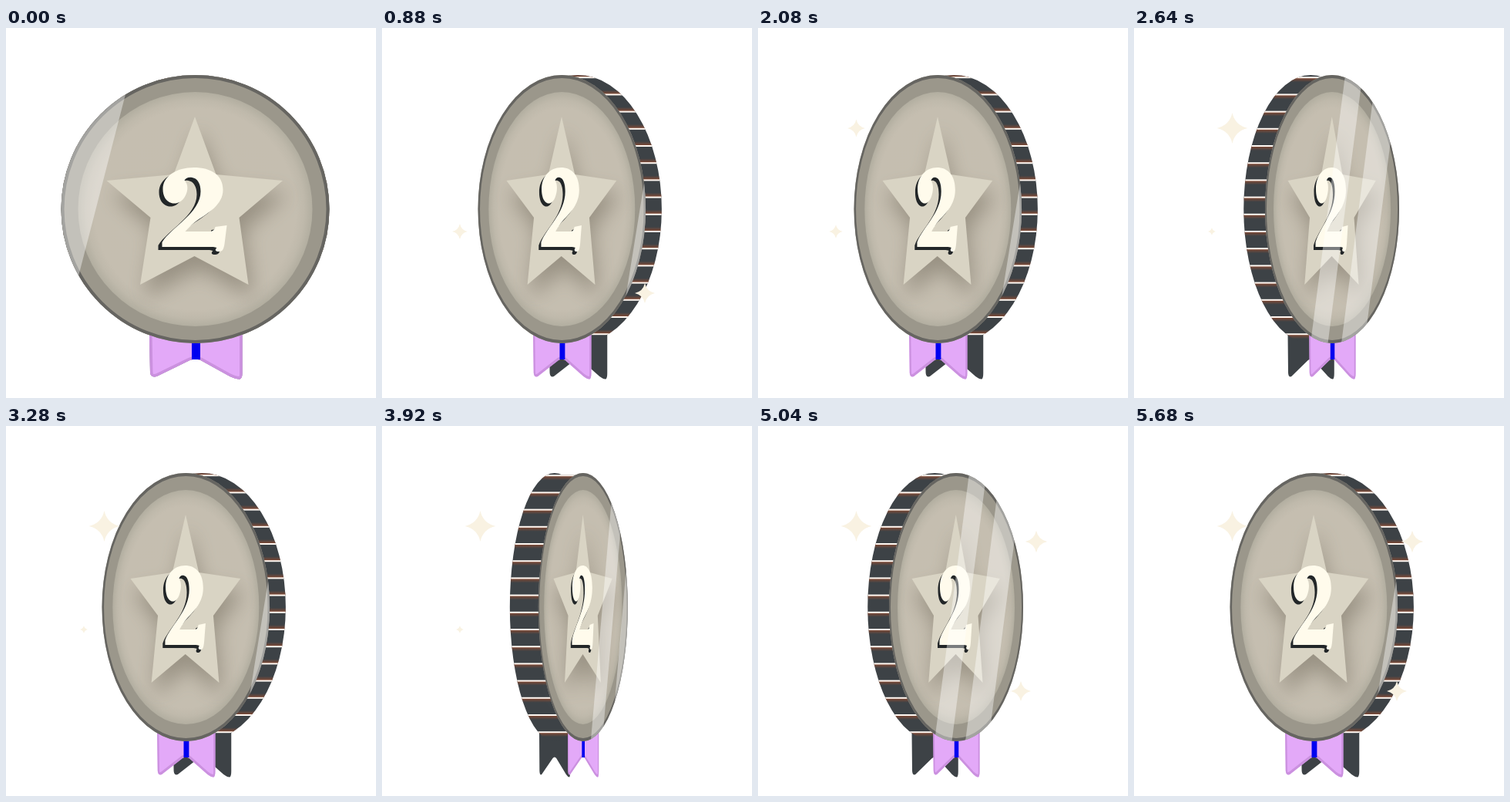
An HTML page with a canvas for the animation above (5760 ms loop, 480 px wide and 480 px high).

```html
<!DOCTYPE html>
<html>
<head>
<meta charset="utf-8">
<style>
html, body { margin: 0; width: 100%; height: 100%; overflow: hidden; background: #fff; }
canvas { display: block; }
</style>
</head>
<body>
<canvas id="stage" width="480" height="480"></canvas>
<script>
const ctx = document.getElementById('stage').getContext('2d');
const STEP = 80, STEPS = 72, TURN = 15, PULSE = 8;
const MID = 245.5, CY = 235, R = 174;
const LEFT = -32.5, RIGHT = 23; // where the two faces sit when the coin is edge-on
const DARK = '#3d4246';

// Face artwork is drawn around x = 0, with y in stage pixels.
const ribbon = new Path2D('M-59.500 396L-58.500 447Q-58 454-50 452L-7 431Q0 428 7 431L45 452Q54 456 58 455.500Q61 454 61 448L61 396Z');
const star = new Path2D('M-.5 115L27 190L113.5 198L57 246L69 333L-1 296L-71.500 333L-58 246L-115 198L-28 190Z');
const digit = new Path2D('M-42 209C-42 192-24 181-2 181C21 181 36 191 36 210C36 229 17 240 2 250' +
  'C-5 255-9 260-13 264L17 264C23 264 25 262 26 258L41 256L38 280C37 286 36 290 31 290' +
  'C26 290 25 288 28 285C25 284 23 284 17 284L-43 284L-43 278C-31 258 7 240 7 212' +
  'C7 202 3 195-4 194C-9 193-13 195-14 198C-9 202-9 211-13 218C-17 226-25 229-31 227C-38 225-42 218-42 209Z');

// x, y, radius and the step at which the first pulse peaks
const sparkles = [[101, 264, 10, 3], [127.5, 130, 23, 8], [361, 150, 16.5, 6], [341, 344, 26, 5]];

function disc(r) {
  ctx.beginPath();
  ctx.arc(0, CY, r, 0, 7);
}

function squeezed(x, w, draw) {
  ctx.save();
  ctx.translate(x, 0);
  ctx.scale(Math.max(w, 0.001), 1);
  draw();
  ctx.restore();
}

function drawRibbon() {
  ctx.fillStyle = '#e3a9f8';
  ctx.fill(ribbon);
  ctx.save();
  ctx.clip(ribbon);
  ctx.strokeStyle = '#cb91df';
  ctx.lineWidth = 7;
  ctx.stroke(ribbon);
  ctx.restore();
  ctx.fillStyle = '#0000f0';
  ctx.fillRect(-4.5, 400, 11, 30);
}

function drawEdge(front, back, w, glowSide) {
  ctx.save();
  ctx.beginPath();
  ctx.ellipse(back, CY, R * w, R, 0, 0, 7);
  ctx.rect(Math.min(front, back), 63, Math.abs(front - back), 336);
  ctx.fillStyle = DARK;
  ctx.fill();
  ctx.clip();
  for (let i = 0; i < 16; i++) {
    const y = 64.2 + i * 22.2;
    const glow = ctx.createLinearGradient(0, y, 0, y + 6 * glowSide);
    glow.addColorStop(0, '#8a4b33');
    glow.addColorStop(1, '#8a4b3300');
    ctx.fillStyle = glow;
    ctx.fillRect(60, y, 370, 6 * glowSide);
    ctx.fillStyle = '#fff8f2';
    ctx.fillRect(60, y - 1, 370, 2);
  }
  ctx.restore();
}

function drawShine(x, width) {
  ctx.beginPath();
  ctx.moveTo(x + 45, CY - R);
  ctx.lineTo(x + width + 45, CY - R);
  ctx.lineTo(x + width - 45, CY + R);
  ctx.lineTo(x - 45, CY + R);
  ctx.fillStyle = 'rgba(255,255,255,.4)';
  ctx.fill();
}

function drawFace(w, shine) {
  disc(R);
  ctx.fillStyle = '#9b978b';
  ctx.fill();
  disc(152);
  const shade = ctx.createRadialGradient(0, CY, 0, 0, CY, 152);
  shade.addColorStop(0, '#c5beaf');
  shade.addColorStop(0.86, '#c5beb0');
  shade.addColorStop(0.93, '#bfb9ab');
  shade.addColorStop(1, '#b2aea0');
  ctx.fillStyle = shade;
  ctx.fill();

  ctx.save();
  ctx.shadowColor = 'rgba(90,84,70,.42)';
  ctx.shadowBlur = 26;
  ctx.shadowOffsetX = 6 * w;
  ctx.shadowOffsetY = 17;
  ctx.fillStyle = '#d9d4c4';
  ctx.fill(star);
  ctx.restore();

  ctx.save();
  ctx.translate(-5, 4);
  ctx.fillStyle = '#222628';
  ctx.fill(digit);
  ctx.restore();
  ctx.fillStyle = '#fffbec';
  ctx.fill(digit);

  disc(R - 2);
  ctx.strokeStyle = '#666561';
  ctx.lineWidth = 4;
  ctx.stroke();

  disc(R);
  ctx.clip();
  drawShine(shine, 45);
  drawShine(shine + 80, 60);
}

function drawSparkle(x, y, r) {
  const c = r * 0.18;
  ctx.beginPath();
  ctx.moveTo(x, y - r);
  ctx.quadraticCurveTo(x + c, y - c, x + r, y);
  ctx.quadraticCurveTo(x + c, y + c, x, y + r);
  ctx.quadraticCurveTo(x - c, y + c, x - r, y);
  ctx.quadraticCurveTo(x - c, y - c, x, y - r);
  ctx.fillStyle = '#f9f2e2';
  ctx.fill();
}

function draw(now) {
  const step = Math.floor(now / STEP) % STEPS;
  const k = step % TURN, closing = k <= 6;
  const w = closing ? 1 - k / 6 : (k - 6) / 8;
  const front = MID + (1 - w) * (closing ? RIGHT : LEFT);
  const back = MID + (1 - w) * (closing ? LEFT : RIGHT);
  const shine = closing ? -269 + 86 * k : 247 - 17 * (k - 6);

  ctx.fillStyle = '#fff';
  ctx.fillRect(0, 0, 480, 480);
  squeezed(back, w, () => {
    ctx.fillStyle = DARK;
    ctx.fill(ribbon);
  });
  drawEdge(front, back, w, closing ? 1 : -1);
  squeezed(front, w, drawRibbon);
  squeezed(front, w, () => drawFace(w, shine));

  for (const [x, y, size, peak] of sparkles) {
    const n = Math.max(0, Math.round((step - peak) / PULSE));
    const d = Math.abs(step - peak - n * PULSE);
    if (d < 3) drawSparkle(x, y, size * Math.cos(d * Math.PI / 6));
  }
}

let start;
function tick(now) {
  start ??= now;
  draw(Math.max(0, now - start));
  requestAnimationFrame(tick);
}
draw(0);
requestAnimationFrame(tick);
</script>
</body>
</html>
```
